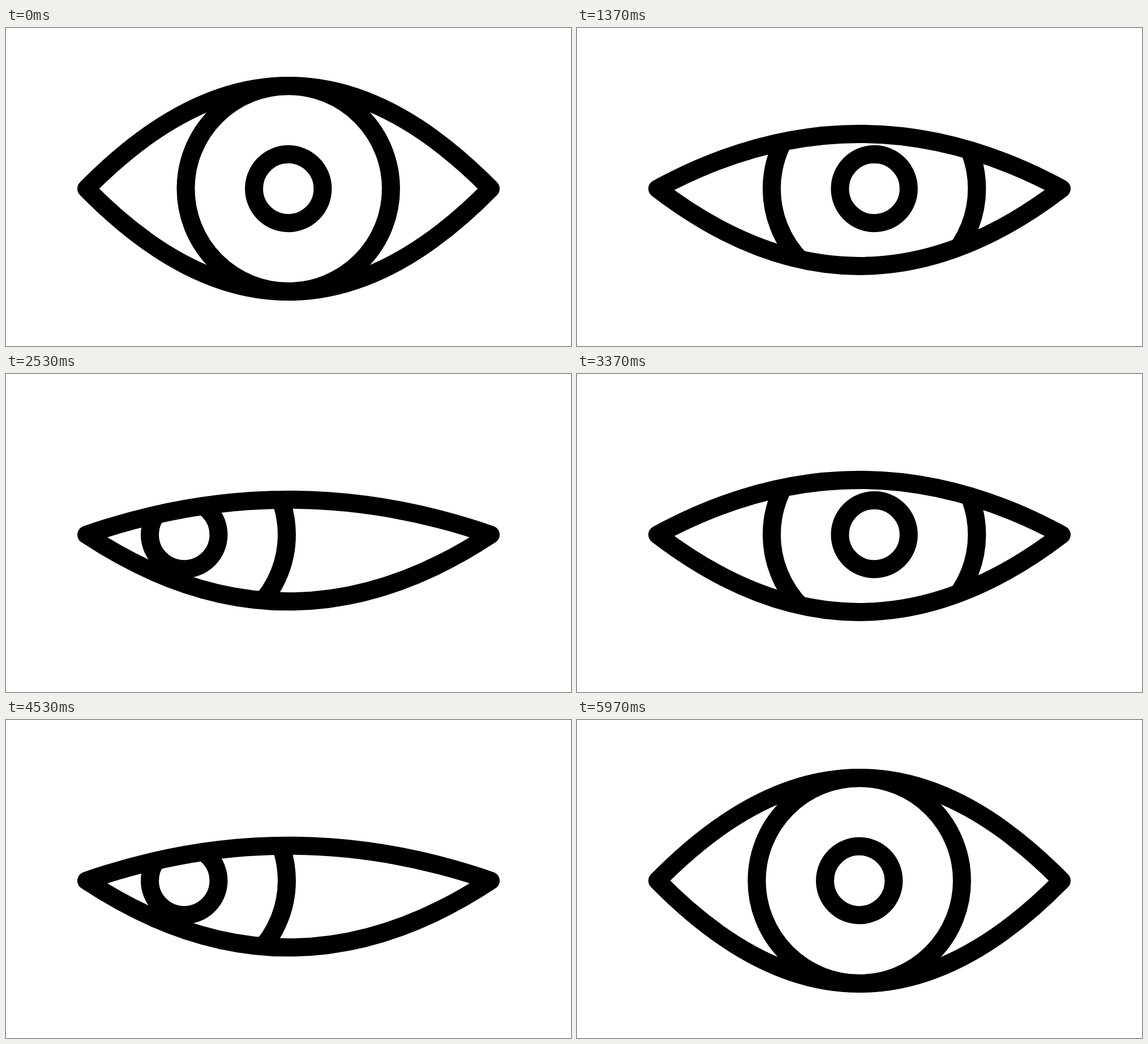
These frames come from a looping animation (998x561 px, 6000 ms). An HTML page:

```html
<!DOCTYPE html>
<html lang="en">
<head>
<meta charset="utf-8">
<title>Blinking eye</title>
<style>
  html, body { margin: 0; width: 100%; height: 100%; overflow: hidden; background: #fff; }
  svg { display: block; width: 100vw; height: 100vh; }
</style>
</head>
<body>
<svg viewBox="0 0 998 561" fill="none" stroke="#000" stroke-width="32" stroke-linejoin="round">
  <clipPath id="opening"><path class="lids"/></clipPath>
  <g clip-path="url(#opening)">
    <g id="iris">
      <circle cx="498.75" cy="283.5" r="181.25"/>
      <circle cx="498.75" cy="283.5" r="60.7"/>
    </g>
  </g>
  <path class="lids"/>
</svg>
<script>
const FPS = 30, CYCLE = 60;
const MID_Y = 283.5;
const lids = document.querySelectorAll('.lids');
const iris = document.getElementById('iris');

// Keys are [frame, value] pairs.
const LOOK = [[0, 0], [12, -184], [16, -184], [29, 156], [31, 156], [44.7, 0], [60, 0]];
const BLINK = [[0, 0], [12.2, 0], [19.75, 1], [27.3, 0], [29.05, 0], [36.55, 1], [44.07, 0], [60, 0]];

const ease = u => (1 - Math.cos(Math.PI * u)) / 2;

function valueAt(keys, frame) {
  const i = keys.findIndex(key => key[0] > frame);
  const [t0, v0] = keys[i - 1], [t1, v1] = keys[i];
  return v0 + (v1 - v0) * ease((frame - t0) / (t1 - t0));
}

function eyePath(closed) {
  const top = 102 + 237 * closed, bottom = 465 - 126 * closed;
  const control = apex => 2 * apex - MID_Y;
  return `M142 ${MID_Y}Q499 ${control(top)} 856 ${MID_Y}Q499 ${control(bottom)} 142 ${MID_Y}Z`;
}

function draw() {
  const frame = Math.floor(performance.now() * FPS / 1000 + 0.11) % CYCLE;
  const path = eyePath(valueAt(BLINK, frame));
  lids.forEach(lid => lid.setAttribute('d', path));
  iris.setAttribute('transform', `translate(${valueAt(LOOK, frame)})`);
  requestAnimationFrame(draw);
}
draw();
</script>
</body>
</html>
```
